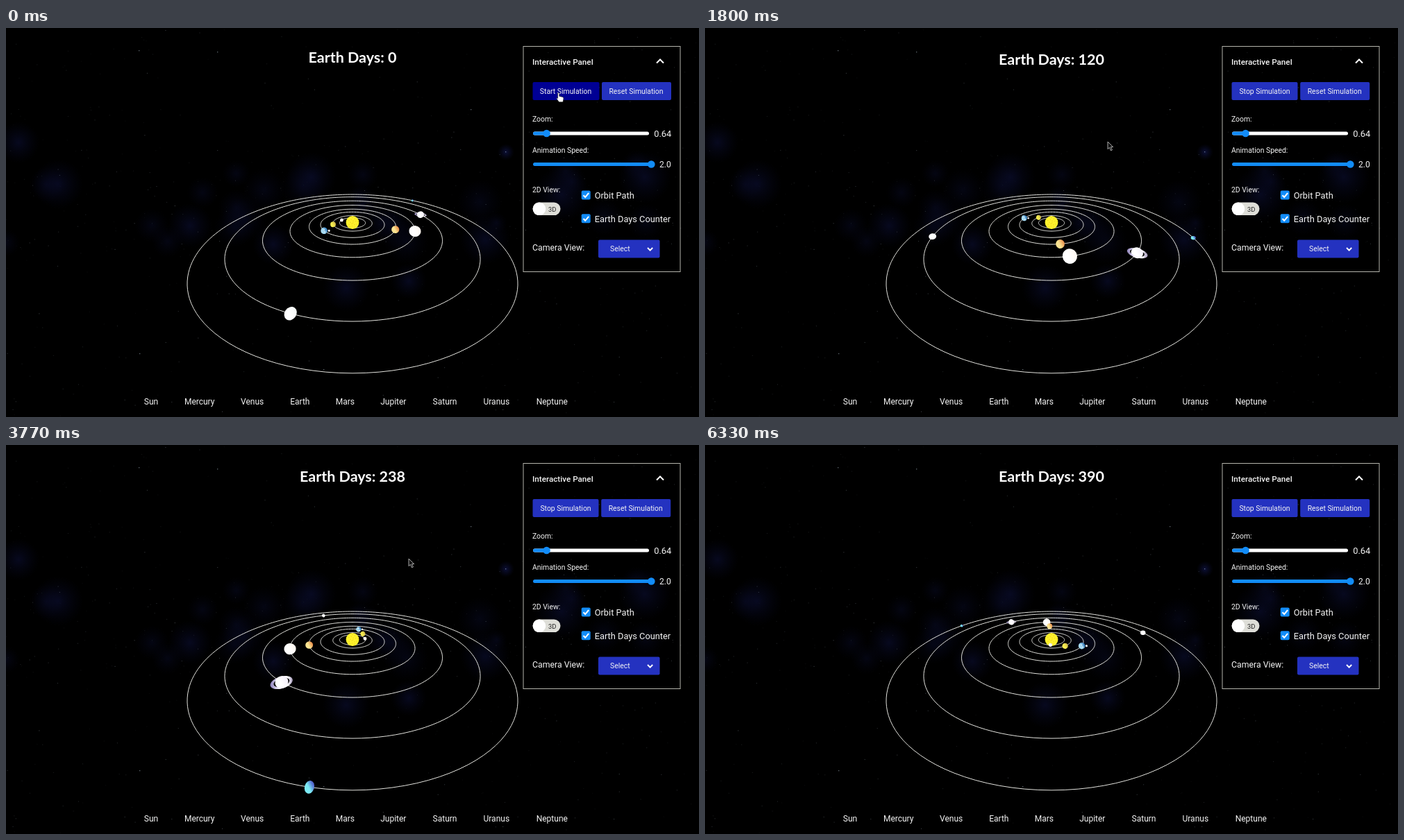
Recreate the animation shown at these times as an HTML page with a canvas. Size 998x561 px, loop 6360 ms.

```html
<!DOCTYPE html>
<html lang="en">
<head>
<meta charset="utf-8">
<title>Solar system simulation</title>
<style>
  html, body { margin: 0; width: 998px; height: 561px; overflow: hidden; background: #000; }
  canvas, svg { position: absolute; left: 0; top: 0; width: 998px; height: 561px; }
  text { font-family: Roboto, "Noto Sans", sans-serif; fill: #f4f4f4; }
  .s { font-size: 10.4px; }
  .m { font-size: 12px; }
  .l { font-size: 12.8px; }
  .mid { text-anchor: middle; }
  .btn { fill: #2432c0; }
  .btn.hover { fill: #000094; }
  .line { fill: none; stroke: #fff; stroke-width: 2; }
  #days { font: 700 21.5px Lato, "Open Sans", sans-serif; fill: #fff; }
</style>
</head>
<body>
<canvas id="space" width="998" height="561"></canvas>
<svg viewBox="0 0 998 561">
  <text id="days" class="mid" x="499" y="50"></text>
  <g id="nav" class="m mid"></g>

  <rect x="745" y="26.5" width="226" height="325" fill="none" stroke="#b4b4ac"/>
  <text x="758" y="53" font-size="11.7" font-weight="500">Interactive Panel</text>
  <path class="line" d="M937 50.5l5-5 5 5"/>

  <rect id="startBox" class="btn" x="758.5" y="78" width="96" height="26" rx="2"/>
  <text id="startText" class="s mid" x="806" y="94.5"></text>
  <g id="reset">
    <rect class="btn" x="858" y="78" width="100" height="26" rx="2"/>
    <text class="s mid" x="907.5" y="94.5">Reset Simulation</text>
  </g>

  <text class="s" x="758" y="135.3">Zoom:</text>
  <rect x="759" y="149.5" width="167" height="5" rx="2.5" fill="#fff"/>
  <rect x="759" y="149.5" width="20" height="5" rx="2.5" fill="#128cf8"/>
  <circle cx="778.5" cy="152" r="5.3" fill="#128cf8"/>
  <text class="l" x="933.3" y="157">0.64</text>

  <text class="s" x="758" y="179.8">Animation Speed:</text>
  <rect x="759" y="194" width="172" height="5" rx="2.5" fill="#128cf8"/>
  <circle cx="929.3" cy="196.5" r="5.3" fill="#128cf8"/>
  <text class="m" x="941" y="201">2.0</text>

  <text class="s" x="758" y="237.3">2D View:</text>
  <rect x="758.5" y="251.5" width="40" height="18.6" rx="9.3" fill="#deded8"/>
  <circle cx="768" cy="260.8" r="9.3" fill="#fff"/>
  <text x="781" y="264.8" font-size="9.4" style="fill:#222">3D</text>

  <g id="box">
    <rect x="828.7" y="234.5" width="13" height="13" rx="2" fill="#128cf8"/>
    <path class="line" d="M831.5 241.2l2.7 2.8 5-6"/>
  </g>
  <use href="#box" y="33.8"/>
  <text class="l" x="847.7" y="246">Orbit Path</text>
  <text class="l" x="847.7" y="280">Earth Days Counter</text>

  <text x="758" y="321" font-size="12.3">Camera View:</text>
  <rect class="btn" x="853" y="305.5" width="88.5" height="26" rx="2"/>
  <text class="s" x="870" y="322.2">Select</text>
  <path class="line" stroke-width="1.6" d="M924 317l3.6 3.6 3.6-3.6"/>

  <path id="hand" fill="#fff" stroke="#111" stroke-width=".6"
    d="M-1.4 0q1.2-1.2 2.2 0v4.4l5 1.2q1.6.6 1.2 2.4l-1 4.8h-5.6l-3.6-5q.2-1.6 1.8-.4z"/>
  <path id="arrow" fill="#111" stroke="#bbb" stroke-width=".9"
    d="M0 0v10.6l2.5-2.3 1.9 4.5 2-.9-2-4.3h3.3z"/>
</svg>
<script>
const $ = id => document.getElementById(id);
const ctx = $('space').getContext('2d');
const LOOP = 6360, TAU = Math.PI * 2, DEG = Math.PI / 180;

// Camera: focal length in pixels, tilt, with the viewing distance as unit.
const CX = 499, CY = 280.5, FOCAL = 232, SIN = 0.394, COS = 0.919;
const project = (x, z) => {
  const depth = 1 - z * COS;
  return { x: CX + FOCAL * x / depth, y: CY + FOCAL * SIN * z / depth, depth };
};

// Orbit radius, start angle in degrees, size in pixels at unit depth, colours.
const planets = [
  { orbit: 0.08, start: 210, size: 2.5, light: '#fff', dark: '#e4e4dc' },
  { orbit: 0.121, start: 166, size: 3.8, light: '#f4ec50', dark: '#d0b848' },
  { orbit: 0.195, start: 143.8, size: 4.3, light: '#a8dcf4', dark: '#2c78bc', moon: true },
  { orbit: 0.2615, start: 22.5, size: 4.9, light: '#fbe492', dark: '#e88c48' },
  { orbit: 0.3654, start: 19.5, size: 7.1, light: '#fff', dark: '#fff8f0' },
  { orbit: 0.4967, start: -16.4, size: 5.4, light: '#fff', dark: '#f4f0fa', ring: true },
  { orbit: 0.641, start: 105, size: 3.65, light: '#fff', dark: '#f6faf8' },
  { orbit: 0.7465, start: -43, size: 2.2, light: '#7ceaf4', dark: '#5468d0' }
];

// Simulation steps at given times; the pace drifts slightly.
const pace = [[364, 36], [1300, 91], [2330, 152], [3170, 202], [4430, 278], [5470, 341], [6330, 390]];
const stepAt = t => {
  if (t <= pace[0][0]) return pace[0][1];
  let i = 1;
  while (i < pace.length - 1 && t > pace[i][0]) i++;
  const [t0, n0] = pace[i - 1], [t1, n1] = pace[i];
  return n0 + (n1 - n0) * (t - t0) / (t1 - t0);
};

let seed = 7;
const rnd = () => {
  seed = (seed * 16807) % 2147483647;
  return seed / 2147483647;
};

function makeSky() {
  const sky = document.createElement('canvas');
  sky.width = 998;
  sky.height = 561;
  const g = sky.getContext('2d');
  g.fillStyle = '#000';
  g.fillRect(0, 0, 998, 561);
  const glow = (x, y, r, a) => {
    const fill = g.createRadialGradient(x, y, 0, x, y, r);
    fill.addColorStop(0, `rgba(14,18,62,${a})`);
    fill.addColorStop(1, 'rgba(8,10,40,0)');
    g.fillStyle = fill;
    g.fillRect(x - r, y - r, 2 * r, 2 * r);
  };
  [[18, 165, 30], [75, 225, 36], [265, 285, 32], [385, 312, 30], [440, 215, 36],
   [490, 375, 34], [580, 365, 26], [690, 305, 36], [800, 240, 40], [920, 215, 38]]
    .forEach(([x, y, r]) => glow(x, y, r, 0.5));
  for (let i = 0; i < 24; i++) glow(rnd() * 998, 190 + rnd() * 130, 14 + rnd() * 20, 0.3);
  glow(720, 179, 12, 0.9);
  for (let i = 0; i < 620; i++) {
    const x = rnd() * 998;
    const y = i % 3 ? rnd() * 561 : 170 + rnd() * 160;
    const a = 0.06 + 0.3 * rnd() ** 3;
    g.fillStyle = `rgba(190,205,220,${a})`;
    g.fillRect(x, y, 1, 1);
  }
  g.fillStyle = 'rgba(190,205,220,.5)';
  [[191, 32], [304, 34], [719, 178], [457, 492], [192, 469], [669, 117]]
    .forEach(([x, y]) => g.fillRect(x, y, 1.3, 1.3));

  g.strokeStyle = '#f0f0ea';
  g.lineWidth = 0.95;
  for (const { orbit } of planets) {
    g.beginPath();
    for (let i = 0; i < 180; i++) {
      const p = project(orbit * Math.cos(i * TAU / 180), orbit * Math.sin(i * TAU / 180));
      g.lineTo(p.x, p.y);
    }
    g.closePath();
    g.stroke();
  }
  return sky;
}
const sky = makeSky();

// A sphere seen off axis is drawn out away from the picture centre.
function ball(p, size, light, dark) {
  const dx = p.x - CX, dy = p.y - CY;
  const r = size / p.depth;
  const stretch = Math.hypot(1, Math.hypot(dx, dy) / FOCAL);
  const fill = ctx.createLinearGradient(p.x - r * 0.7, p.y + r * 0.5, p.x + r, p.y - r * 0.4);
  fill.addColorStop(0.35, light);
  fill.addColorStop(0.95, dark);
  ctx.fillStyle = fill;
  ctx.beginPath();
  ctx.ellipse(p.x, p.y, r * stretch, r, Math.atan2(dy, dx), 0, TAU);
  ctx.fill();
}

function ringArc(x, z, from, to, p) {
  const inner = 6.5 / FOCAL, outer = 9.2 / FOCAL;
  const add = (r, a) => {
    const q = project(x + r * Math.cos(a), z + r * Math.sin(a));
    ctx.lineTo(q.x, q.y);
  };
  const turn = (to - from) / 32;
  ctx.beginPath();
  for (let i = 0; i <= 32; i++) add(outer, from + i * turn);
  for (let i = 32; i >= 0; i--) add(inner, from + i * turn);
  const w = 9 / p.depth;
  const fill = ctx.createLinearGradient(p.x - w, 0, p.x + w, 0);
  fill.addColorStop(0, '#9a8ec4');
  fill.addColorStop(0.35, '#f6f2fc');
  fill.addColorStop(0.8, '#fff');
  fill.addColorStop(1, '#b8aecb');
  ctx.fillStyle = fill;
  ctx.fill();
}

function sun() {
  ctx.fillStyle = '#fff22c';
  ctx.beginPath();
  ctx.arc(CX, CY, 9.4, 0, TAU);
  ctx.fill();
  ctx.fillStyle = 'rgba(225,180,20,.55)';
  for (let i = 0; i < 16; i++) {
    const r = 8 * Math.sqrt(i / 16), a = i * 2.4;
    ctx.fillRect(CX + r * Math.cos(a), CY + r * Math.sin(a), 1.5, 1);
  }
}

function planet(b) {
  if (b.ring) ringArc(b.px, b.pz, Math.PI, TAU, b.at);
  ball(b.at, b.size, b.light, b.dark);
  if (b.ring) ringArc(b.px, b.pz, 0, Math.PI, b.at);
  if (b.moon) {
    const { x, y, depth } = b.at;
    ctx.fillStyle = '#fff';
    ctx.fillRect(x - 1, y - 2, 1.6, 1.2);
    ctx.fillRect(x + 0.5, y + 1, 1.4, 1.2);
    ball({ x: x + 6.3 / depth, y, depth }, 1.4, '#fff', '#ddd');
  }
}

const names = ['Sun', 'Mercury', 'Venus', 'Earth', 'Mars', 'Jupiter', 'Saturn', 'Uranus', 'Neptune'];
const spots = [209, 278.7, 354.7, 423.3, 488.3, 557.8, 632, 706.3, 786.3];
$('nav').innerHTML = names.map((n, i) => `<text x="${spots[i]}" y="542.5">${n}</text>`).join('');

const ease = u => u * u * (3 - 2 * u);
const part = (t, from, to) => Math.min(1, Math.max(0, (t - from) / (to - from)));

function panel(t, step) {
  const days = Math.floor(step < 91 ? (step - 36) * 91 / 55 : step + 0.001);
  $('days').textContent = 'Earth Days: ' + days;
  $('days').setAttribute('y', days < 10 ? 50 : days < 100 ? 51.5 : 53);

  const running = t >= 364;
  $('startText').textContent = running ? 'Stop Simulation' : 'Start Simulation';
  $('startBox').setAttribute('class', t < 480 ? 'btn hover' : 'btn');
  $('startBox').setAttribute('width', running ? 95 : 96);
  $('reset').setAttribute('transform', `translate(${running ? -0.8 : 0})`);

  const go = ease(part(t, 400, 1100)), out = part(t, 5230, 5470);
  const leave = Math.max(0, t - 5470) * 0.5;
  const x = 796 - 216 * go - 50 * out;
  const y = 94 + 70 * go - 156 * out - leave;
  const hand = t < 480;
  for (const id of ['hand', 'arrow']) {
    $(id).setAttribute('transform', `translate(${x} ${y})`);
    $(id).style.display = (id === 'hand') === hand && leave < 25 ? '' : 'none';
  }
}

function draw(t) {
  const step = stepAt(t);
  ctx.drawImage(sky, 0, 0);
  for (const b of planets) {
    const a = (b.start + (step - 36) * 0.69) * DEG;
    b.px = b.orbit * Math.cos(a);
    b.pz = b.orbit * Math.sin(a);
    b.at = project(b.px, b.pz);
  }
  const sorted = [...planets].sort((a, b) => a.pz - b.pz);
  sorted.filter(b => b.pz < 0).forEach(planet);
  sun();
  sorted.filter(b => b.pz >= 0).forEach(planet);
  panel(t, step);
}

const begin = performance.now();
function tick() {
  draw((performance.now() - begin) % LOOP);
  requestAnimationFrame(tick);
}
tick();
</script>
</body>
</html>
```
